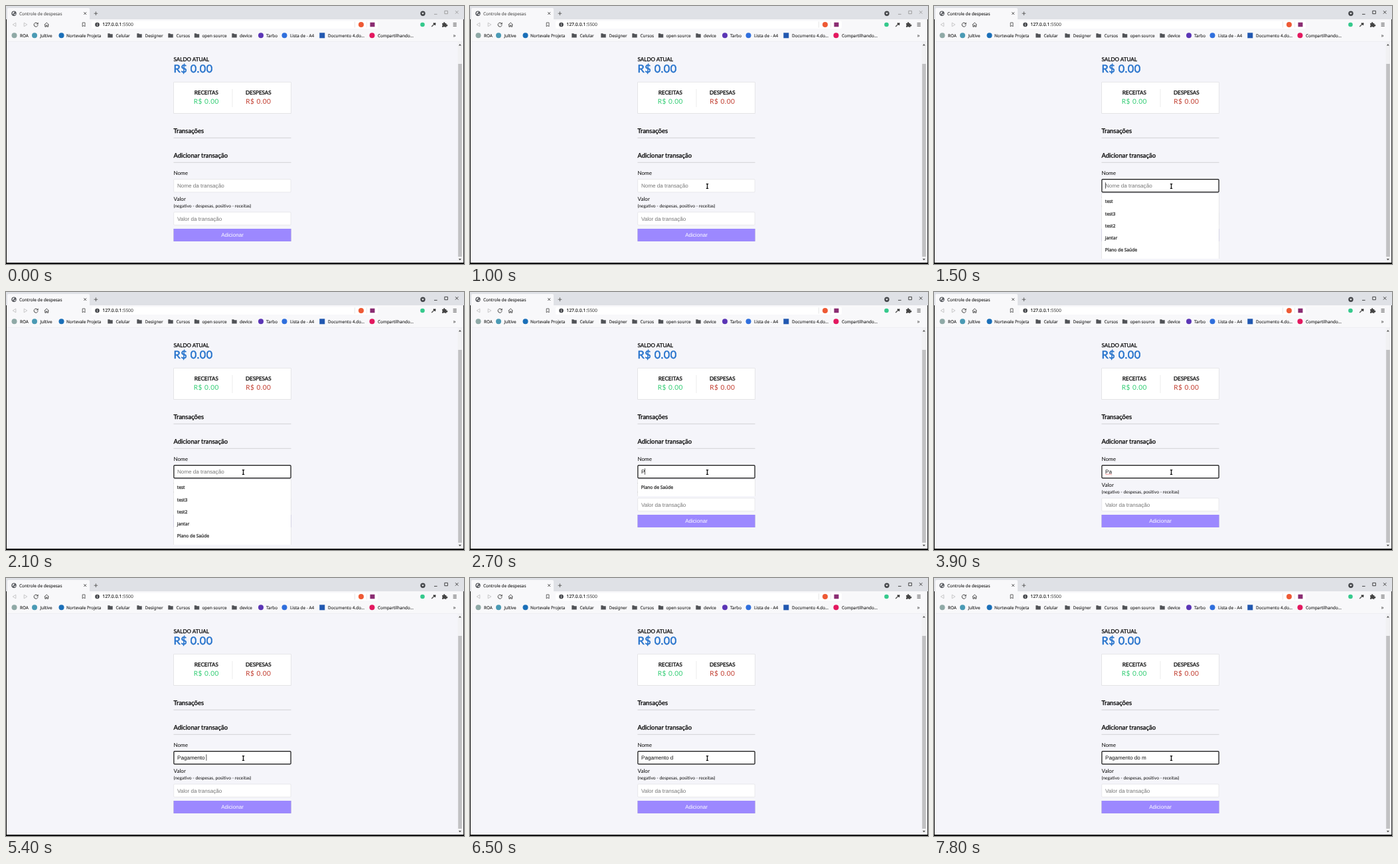
An HTML page for the animation above (8 s loop, 690x388 px).

```html
<!DOCTYPE html>
<html lang="pt-BR">
<head>
<meta charset="utf-8">
<title>Controle de despesas</title>
<style>
  html, body { margin: 0; width: 100%; height: 100%; overflow: hidden; background: #f5f5fa; }
  svg { display: block; width: 690px; height: 388px; }
  text { white-space: pre; text-rendering: geometricPrecision; }
  .ui { font-family: "Noto Sans", "Open Sans", sans-serif; font-size: 6.4px; stroke-width: .025em; }
  .option { font-size: 6.65px; stroke-width: .045em; }
  .lato { font-family: Lato, sans-serif; font-size: 8.08px; fill: #0a0a0a; }
  .heavy { stroke: currentColor; stroke-width: .035em; }
  .field { font-family: "Liberation Sans", Arial, sans-serif; font-size: 8.1px; }
  .raised { filter: drop-shadow(0 .5px .75px rgba(0, 0, 0, .12)) drop-shadow(0 .5px .5px rgba(0, 0, 0, .24)); }
</style>
</head>
<body>
<svg id="stage" viewBox="0 0 690 388"></svg>
<script>
const LOOP = 8000;
const stage = document.getElementById('stage');

function add(tag, attrs, parent = stage) {
  const node = document.createElementNS('http://www.w3.org/2000/svg', tag);
  for (const key in attrs) node.setAttribute(key, attrs[key]);
  parent.appendChild(node);
  return node;
}
const rect = (x, y, width, height, fill, extra = {}, parent) =>
  add('rect', { x, y, width, height, fill, ...extra }, parent);
const circle = (cx, cy, r, fill) => add('circle', { cx, cy, r, fill });
const line = (d, stroke, width = 1, extra = {}) =>
  add('path', { d, stroke, 'stroke-width': width, fill: 'none', ...extra });
const shape = (d, fill, extra = {}, parent) => add('path', { d, fill, ...extra }, parent);
function text(content, x, y, cls, extra = {}, parent) {
  const node = add('text', { x, y, class: cls, ...extra }, parent);
  node.textContent = content;
  return node;
}
const label = (content, x, y, color = '#333', cls = 'ui', parent) =>
  text(content, x, y, cls, { fill: color, stroke: color }, parent);
const heavy = (content, x, y, size, color = '#0a0a0a', extra = {}) =>
  text(content, x, y, 'lato heavy',
    { style: `font-size:${size}px;fill:${color};color:${color}`, ...extra });
const show = (node, on) => node.setAttribute('visibility', on ? 'visible' : 'hidden');

let tabTitle, controls;

function drawTabs() {
  rect(0, 0, 690, 20, '#dfe1e6');
  shape('M2 20V5q0-2 2-2H124q2 0 2 2V20z', '#f8f8fa');
  circle(12, 11.2, 3.7, '#55585d');
  shape('M9.6 10.2q1.6-2.3 3.2-1.5l-.7 1.7-1.3.5.3 1.4-1 .4zM12.3 12l2-.4.2 1.2-1.7 1.2z', '#f8f8fa');
  tabTitle = label('Controle de despesas', 20, 13.5);
  line('M117.3 9.2l3.8 3.8m0-3.8l-3.8 3.8', '#444', .9);
  line('M132.6 11.2h5.6m-2.8-2.8v5.6', '#555', .9);
  circle(628, 11.2, 3.7, '#45474b');
  shape('M626.2 10.3h3.6l-1.8 2.4z', '#fff');
  controls = line('M645 12.4h4.6M660.8 7.3h4.6v4.4h-4.6zM677 7.2l4.4 4.4m0-4.4l-4.4 4.4', '#999', .9);
}

function drawToolbar() {
  rect(0, 20, 690, 34, '#f8f8fa');
  line('M14.8 25.2v5.6l-4.6-2.8zM27.2 25.2v5.6l4.6-2.8z', '#bbb', .8);
  line('M47.4 26.2a3 3 0 1 0 .7 2.3', '#444', 1);
  shape('M48.6 24.6v3h-3z', '#444');
  line('M57.8 28.2l3.4-3.2 3.4 3.2M58.8 27.5v3.7h1.6v-2.2h1.6v2.2h1.6v-3.7', '#444', .9);
  line('M115.2 25h3.8v6l-1.9-1.7-1.9 1.7z', '#555', .9);
  rect(129, 22.5, 431, 11.5, '#fff', { rx: 2 });
  circle(137.5, 28, 3.3, '#45474b');
  rect(137.1, 26, .8, .9, '#fff');
  rect(137.1, 27.5, .8, 2.4, '#fff');
  const url = text('127.0.0.1', 145.2, 30.4, 'ui', { style: 'font-size:6.9px', fill: '#222', stroke: '#222' });
  add('tspan', { fill: '#666', stroke: '#666' }, url).textContent = ':5500';
  line('M525.5 23.5v9', '#ddd', .7);
  circle(535, 28, 4, '#ee5a35');
  rect(548.5, 24.7, 7, 6.6, '#8a2c72');
  line('M543.5 23.5v9', '#e6e6e6', .7);
  circle(627.5, 28, 3.3, '#35c98c');
  line('M641.2 31l4-4', '#555', 1.3);
  line('M644 25.6l3 3m-1.4-1.4l1.6-1.6', '#333', 1.8);
  shape('M657 26h2a1.3 1.3 0 1 1 2.4 0h2v2a1.3 1.3 0 1 1 0 2.2v1.6h-2.2a1.2 1.2 0 0 0-2.2 0H657v-2a1.2 1.2 0 0 0 0-2.2z', '#444');
  line('M673.6 25.8h5.2m-5.2 2.2h5.2m-5.2 2.2h5.2', '#444', .9);
}

function drawBookmarks() {
  const folder = x => shape(`M${x - 3.7} 41.3h2.8l1 1h3.6v5.1h-7.4z`, '#505256');
  const dot = color => x => circle(x, 44.3, 4, color);
  const square = color => x => rect(x - 4, 40.3, 8, 8, color);
  [
    ['ROA', 12.5, 21, dot('#8fa9a6')],
    ['Jultive', 43, 51.5, dot('#4a9ab4')],
    ['Nortevale Projeta', 83.5, 91, dot('#1a6fb8')],
    ['Celular', 157, 165.5, folder],
    ['Designer', 201, 209.5, folder],
    ['Cursos', 248, 256.5, folder],
    ['open source', 287.5, 295.5, folder],
    ['device', 344, 352, folder],
    ['Tarbo', 384, 392, dot('#5b35b5')],
    ['Lista de - A4', 419.5, 428, dot('#2f6fdd')],
    ['Documento 4.do…', 476.3, 485, square('#2158b0')],
    ['Compartilhando…', 551.5, 560, dot('#e3185f')]
  ].forEach(([name, iconX, nameX, icon]) => {
    icon(iconX);
    label(name, nameX, 46.7);
  });
  text('»', 673.5, 46.8, 'ui', { fill: '#333', style: 'font-size:8px' });
  line('M0 53.7h690', '#e3e3e7', .6);
}

function inputBox(y) {
  rect(252.7, y, 176.4, 19.4, '#fff', { rx: 1, stroke: '#dcdce0', 'stroke-width': .6 });
}

function drawPage() {
  rect(0, 54, 690, 334, '#f5f5fa');
  heavy('SALDO ATUAL', 252.5, 83.2, 8.08);
  heavy('R$ 0.00', 252.5, 100.3, 16.16, '#2371cb', { 'letter-spacing': .505 });

  rect(252.6, 114.7, 176.8, 46.8, '#fff', { class: 'raised' });
  line('M341 125v27', '#dedede', .6);
  [['RECEITAS', 301.8, '#2ecc71'], ['DESPESAS', 380.3, '#c0392b']].forEach(([name, x, color]) => {
    heavy(name, x, 132.6, 8.08, '#0a0a0a', { 'text-anchor': 'middle' });
    text('R$ 0.00', x, 147, 'lato',
      { style: `font-size:10.1px;fill:${color}`, 'letter-spacing': .505, 'text-anchor': 'middle' });
  });

  heavy('Transações', 252.5, 190.7, 9.45);
  heavy('Adicionar transação', 252.5, 227.6, 9.45);
  line('M252.5 198.3h177M252.5 235.3h177', '#bbb', .6);

  text('Nome', 252.5, 253.6, 'lato');
  inputBox(260.6);
  text('Valor', 252.5, 293.4, 'lato');
  text('(negativo - despesas, positivo - receitas)', 252.5, 303, 'lato', { style: 'font-size:6.73px' });
  inputBox(310);
  text('Valor da transação', 258, 322.6, 'field', { fill: '#757575' });

  rect(252.6, 335, 176.8, 18.9, '#9c88ff', { class: 'raised' });
  text('Adicionar', 341, 347, 'field', { fill: '#fff', 'text-anchor': 'middle' });

  rect(680.5, 54, 7.5, 333, '#f1f1f3');
  rect(681.2, 87, 5.6, 290, '#c1c1c3');
  shape('M681.9 59.5h4l-2-2.4z', '#505050');
  shape('M681.9 380h4l-2 2.4z', '#505050');
  rect(0, 20, 1, 368, '#111');
  rect(689, 20, 1, 368, '#333');
  rect(0, 386, 690, 2, '#000');
}

function makeDropdown(rows, height) {
  const group = add('g', {});
  rect(252.4, 281.7, 177.2, height, '#fff', { class: 'raised' }, group);
  rows.forEach((row, i) => label(row, 257.8, 296.4 + i * 18.2, '#333', 'ui option', group));
  return group;
}

drawTabs();
drawToolbar();
drawBookmarks();
drawPage();

const fullList = makeDropdown(['test', 'test3', 'test2', 'jantar', 'Plano de Saúde'], 98.3);
const shortList = makeDropdown(['Plano de Saúde'], 25.3);
const focusRing = rect(252.9, 260.7, 176.2, 19.2, 'none', { rx: 1.2, stroke: '#111', 'stroke-width': 1.2 });
const placeholder = text('Nome da transação', 258, 272.9, 'field', { fill: '#757575' });
const typed = text('', 258, 272.9, 'field', { fill: '#111' });
const squiggle = line('M258 274.2' + 'q.6-1 1.25 0t1.25 0'.repeat(4), '#e33', .6);
const caret = rect(258, 265.3, .7, 9.4, '#111');

const arrow = add('g', {});
shape('M0 0v8.6l2-1.9 1.4 3 1.4-.6-1.4-2.9h2.8z', '#111', { stroke: '#fff', 'stroke-width': .6 }, arrow);
const beam = line('M-1.7-3.3h3.4M0-3.3v6.6M-1.7 3.3h3.4', '#111', 1.3,
  { transform: 'translate(357.5 271)' });

const typing = [
  [0, ''], [2700, 'P'], [2900, 'Pa'], [4300, 'Pag'], [4400, 'Paga'], [4500, 'Pagam'],
  [4700, 'Pagame'], [4900, 'Pagamen'], [5000, 'Pagament'], [5100, 'Pagamento'],
  [5400, 'Pagamento '], [5500, 'Pagamento d'], [5700, 'Pagamento da'],
  [6500, 'Pagamento d'], [6800, 'Pagamento do'], [7000, 'Pagamento do '], [7200, 'Pagamento do m']
];
const blinks = [[0, false], [1500, true], [2100, false], [2700, true], [3500, false],
  [4100, true], [6300, false], [6800, true], [7800, false]];
const pointer = [[100, 566, 42], [500, 192, 318], [900, 357.5, 271]];

const latest = (steps, t) => steps.filter(step => step[0] <= t).pop()[1];

function pointerAt(t) {
  const i = t < pointer[1][0] ? 0 : 1;
  const [t0, x0, y0] = pointer[i];
  const [t1, x1, y1] = pointer[i + 1];
  const k = Math.min(1, Math.max(0, (t - t0) / (t1 - t0)));
  const e = k * k * (3 - 2 * k);
  return [x0 + (x1 - x0) * e, y0 + (y1 - y0) * e];
}

function render(time) {
  const t = Math.floor(time / 100) * 100;
  const focused = t >= 1500;
  const value = latest(typing, t);
  const titleColor = focused ? '#333' : '#666';

  tabTitle.setAttribute('fill', titleColor);
  tabTitle.setAttribute('stroke', titleColor);
  controls.setAttribute('stroke', focused ? '#333' : '#999');
  show(focusRing, focused);
  show(placeholder, !value);
  show(fullList, focused && t < 2700);
  show(shortList, t >= 2700 && t < 3200);
  shortList.setAttribute('opacity', t < 2900 ? 1 : Math.max(0, (3200 - t) / 400));

  if (typed.textContent !== value) typed.textContent = value;
  show(squiggle, t >= 3900 && t < 4300);
  show(caret, latest(blinks, t));
  caret.setAttribute('x', 257.9 + (value ? typed.getComputedTextLength() : 0));

  show(arrow, t >= 100 && t < 900);
  arrow.setAttribute('transform', `translate(${pointerAt(t).join(' ')})`);
  show(beam, t >= 900);
}

const start = performance.now();
function tick() {
  render((performance.now() - start) % LOOP);
  requestAnimationFrame(tick);
}
tick();
</script>
</body>
</html>
```
